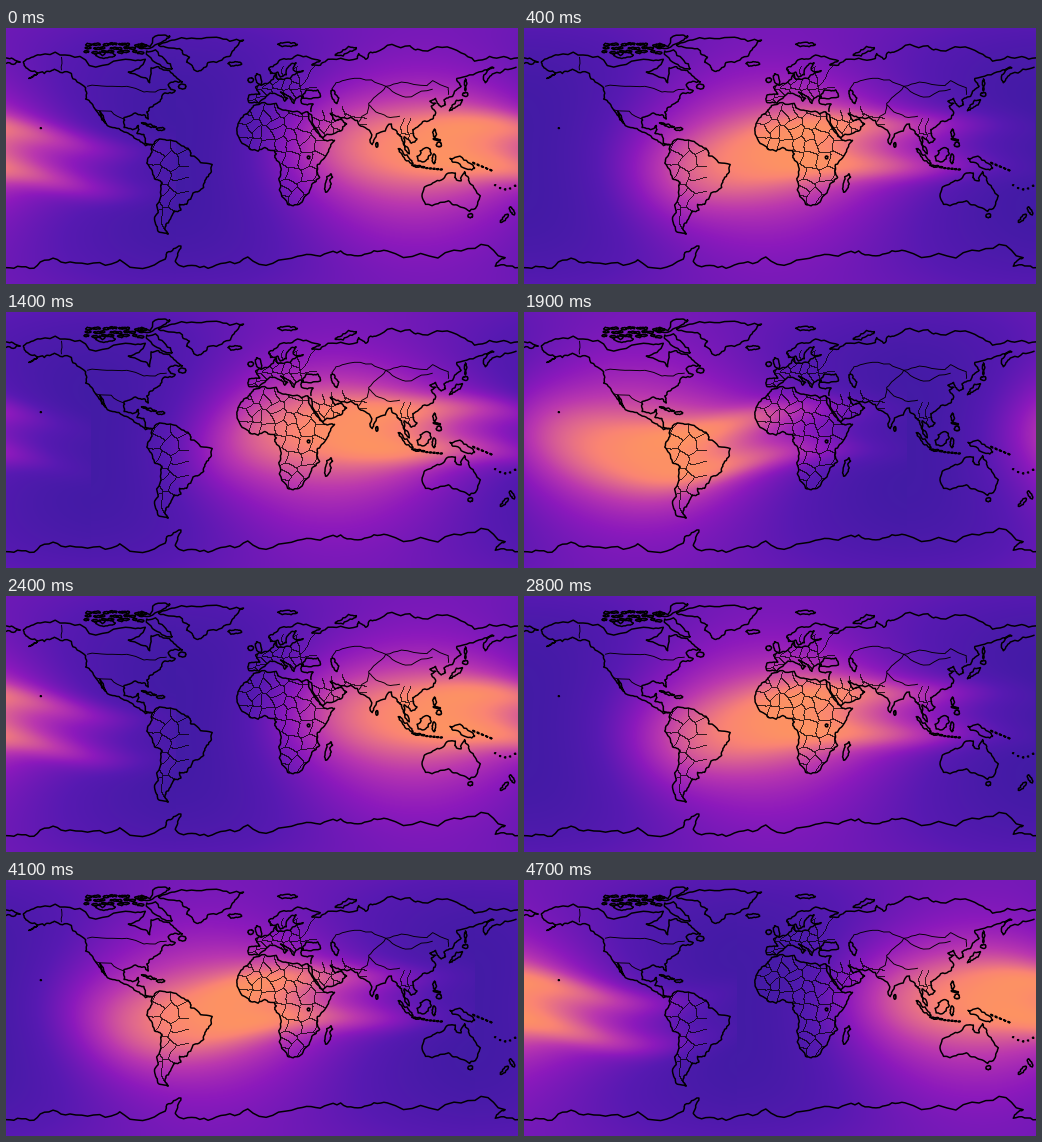
A matplotlib script for the animation above (4800 ms loop, 512x256 px).

```python
import numpy as np
import matplotlib.pyplot as plt
from matplotlib.animation import FuncAnimation
from matplotlib.collections import LineCollection
from matplotlib.colors import LinearSegmentedColormap
from matplotlib.path import Path

W, H, DPI = 512, 256, 100
FRAMES, STEPS_PER_DAY, INTERVAL = 48, 12, 100
rng = np.random.default_rng(4)
x, y = np.meshgrid(np.arange(W) + 0.5, np.arange(H) + 0.5)
coasts, borders = [], []
ink = np.zeros((H, W), bool)


def project(*lonlat):
    p = np.array(lonlat, float).reshape(-1, 2)
    return np.column_stack([(p[:, 0] + 180) * W / 360, (90 - p[:, 1]) * H / 180])


def roughen(p, rounds=3, amount=0.1):
    """Split every segment and push its middle sideways."""
    for _ in range(rounds):
        d = np.diff(p, axis=0)
        side = np.column_stack([-d[:, 1], d[:, 0]])
        mid = p[:-1] + d / 2 + side * rng.normal(0, amount, (len(d), 1))
        out = np.empty((2 * len(p) - 1, 2))
        out[::2], out[1::2] = p, mid
        p = out
    return p


def coast(*lonlat):
    coasts.append(roughen(project(*lonlat)))
    return coasts[-1]


def land(*lonlat):
    return coast(*lonlat, *lonlat[:2])


def island(lon, lat, rx, ry, tilt=0):
    a = np.linspace(0, 2 * np.pi, 9)
    t = np.radians(tilt)
    u, v = rx * np.cos(a), ry * np.sin(a)
    ring = np.column_stack([lon + u * np.cos(t) - v * np.sin(t),
                            lat + u * np.sin(t) + v * np.cos(t)])
    coasts.append(roughen(project(*ring.ravel()), 2, 0.15))


def border(*lonlat):
    borders.append(roughen(project(*lonlat), 2, 0.05))


def countries(outline, west, south, east, north, step):
    """Divide a region into cells around a jittered lattice of centres."""
    gx, gy = np.meshgrid(np.arange(west, east, step), np.arange(south, north, step))
    sites = np.column_stack([gx.ravel(), gy.ravel()]) + rng.uniform(-0.4, 0.4, (gx.size, 2)) * step
    wx, wy = x + 1.2 * np.sin(y / 3), y + 1.2 * np.sin(x / 4)
    cell = np.argmin([(wx - a) ** 2 + (wy - b) ** 2 for a, b in project(*sites.ravel())], axis=0)
    edge = (cell != np.roll(cell, 1, 1)) | (cell != np.roll(cell, 1, 0))
    inside = Path(outline).contains_points(np.column_stack([x.ravel(), y.ravel()]))
    (x0, y1), (x1, y0) = project(west - step, south - step, east + step / 2, north + step / 2)
    box = (x > x0) & (x < x1) & (y > y0) & (y < y1)
    ink[edge & inside.reshape(H, W) & box] = True


# Continents
land(-168, 66, -156, 71, -128, 70, -96, 68, -82, 68, -94, 59, -82, 55, -79, 51.5, -78, 62, -70, 61,
     -65, 60, -56, 52, -66, 50, -65, 48, -61, 46, -66, 44, -70, 43, -76, 36, -81, 31, -80, 26,
     -83, 29, -90, 30, -97, 27, -97, 20, -91, 18.5, -87, 21.5, -88, 16, -83, 15, -82, 9, -77.5, 8,
     -85.5, 10, -94, 16, -105, 20, -114, 31.5, -110, 23, -117, 32.5, -124, 40, -124, 48, -134, 58,
     -146, 61, -153, 58, -164, 54.5, -158, 58.5, -166, 62)
south_america = land(
    -77, 8, -72, 12, -62, 10.5, -51, 4, -50, 0, -35, -6, -39, -15, -41, -22, -48.5, -26, -53, -34,
    -58, -34, -57, -38, -62, -39, -65, -45, -68, -52, -66, -55, -73, -53, -75, -47, -73.5, -37,
    -70.3, -18.5, -76, -14, -81, -5, -77.5, 4)
africa = land(
    32.5, 31, 20, 31.5, 11, 34, 10, 37, -6, 35.5, -10, 30, -17, 21, -17, 14.5, -13, 8.5, -8, 4.5,
    2, 6, 9, 4, 9, -1, 13.5, -9, 12, -17, 18, -34, 26, -34, 33, -26, 35, -20, 40.5, -15, 39, -6,
    46, 2, 51, 11, 44, 11, 37, 20)
europe = coast(
    44, 66, 35, 64, 41, 67, 25, 71, 14, 68, 5, 62, 6, 58, 11, 59, 13, 55.5, 17, 57, 18, 62, 24, 65.5,
    22, 60.5, 29, 60, 24, 58, 20, 54.5, 11, 54, 10, 57.5, 8, 54, 2, 51, -4.5, 48.5, -1.5, 43.5,
    -9, 43, -9, 37.5, -2, 37, 3, 42, 9, 44, 16, 38.5, 18, 40.5, 13, 45, 19.5, 41.5, 22.5, 37,
    24, 40.5, 29, 41.5, 31, 46.5, 39, 46.5, 41, 41.5, 28, 41, 28, 37, 36, 36.5, 34.5, 31)
asia = coast(
    32.5, 30, 35, 28, 43, 13, 55, 17.5, 59.5, 22.5, 56, 26, 51, 25, 48, 30, 57, 27, 67, 25, 72.5, 20,
    77.5, 8, 80.5, 15.5, 91, 22.5, 95, 16, 98.5, 11, 103.5, 1.5, 100, 9, 100, 13.5, 105, 9, 109, 12,
    106, 18.5, 110, 21, 120, 26, 122, 31, 119, 35, 122, 37, 118, 38.5, 122, 40.5, 126, 34.5, 129, 36,
    128, 39.5, 135, 44, 140, 49, 137, 54.5, 155, 59.5, 163, 62, 156, 57, 157, 51.5, 163, 58,
    179, 62.5)
coast(180, 69, 160, 70, 140, 72.5, 113, 74, 104, 77.5, 80, 73, 73, 68, 68, 72, 67, 68.5, 44, 66)
coast(-180, 69, -170, 66, -180, 65)
land(114, -22, 115, -34, 124, -33.5, 131, -31.5, 138, -35, 146, -39, 150, -37, 153.5, -28, 146, -19,
     142.5, -11, 140, -17.5, 135.5, -15, 136, -12, 131, -12, 122, -18)
coast(-180, -78.5, -158, -77, -135, -74.5, -102, -74.5, -100, -73, -68, -72.5, -67, -68, -57, -63.3,
      -61, -74, -58, -77, -35, -78, -10, -71, 25, -70.5, 50, -67, 70, -70, 88, -66.7, 135, -66.2,
      171, -71.5, 164, -77.5, 180, -78.5)
land(-73, 78, -58, 75.5, -51, 69.5, -53, 66, -48, 60.8, -43, 60, -38, 65.7, -23, 70, -19, 76,
     -13, 81.5, -32, 83.5, -60, 82)

# Larger islands and lakes: centre, half axes, tilt
for shape in [(-2.5, 54, 4.2, 1.8, 110), (-8, 53.3, 2, 1.6), (-19, 65, 5, 1.4),
              (18, 78.6, 7, 1.4), (59, 73.5, 8, 1.4, 20), (-79.5, 21.7, 5.5, 0.7, -17),
              (-71.3, 19, 3, 0.9), (-56, 48.8, 2.8, 1.8), (-155.5, 19.6, 0.4, 0.3),
              (46.8, -19, 6.8, 2, 72), (80.8, 7.8, 0.9, 1.7), (101, -0.2, 7.5, 1.4, -46),
              (110, -7.3, 4.7, 0.6, -8), (114, 0.8, 6, 4, 45), (121, -2, 1.2, 3.5),
              (141, -5.2, 9.5, 2.5, -22), (121.3, 16, 1, 3), (124.5, 8, 2, 1.7),
              (136.5, 35.8, 6.2, 1.2, 40), (143, 43.4, 2, 1.5), (143, 50, 0.7, 4.2),
              (146.6, -42, 1.8, 1.5), (175.8, -38.6, 3.3, 1.3, 120), (170.4, -43.8, 4, 1.2, 45),
              (51, 41.8, 5.2, 1.8, 110), (32.8, -1, 1, 1)]:
    island(*shape)
# Arctic archipelago
island(-72, 67.5, 11, 3, -35)
island(-110, 71, 7, 2)
island(-76, 80.5, 12, 2.5, 20)
for lon in np.linspace(-122, -84, 8):
    for lat in (73, 76, 78.2):
        island(lon + rng.uniform(-2, 2), lat + rng.uniform(-0.6, 0.6), rng.uniform(1.5, 3.5), 0.7)
# Island chains of the western Pacific
for t in np.linspace(0, 1, 5):
    island(116 + 10 * t, -8.5 - t, 0.9, 0.3)
    island(149 + 12 * t, -5 - 5 * t, 0.9, 0.3, -30)
    island(164 + 14 * t, -20.5 - 3 * np.sin(3 * t), 0.5, 0.3)
    island(121 + 4 * t, 12 - t, 0.6, 0.5)

border(-123, 49, -109, 49, -95, 49)
border(-95, 49, -83, 45, -75, 45, -67, 47)
border(-141, 69.7, -141, 60.3)
border(-117, 32.5, -106, 31.5, -97, 26)
border(49, 47, 52, 51.5, 61, 54, 77, 53.5, 87, 49, 98, 52, 116, 49.5, 120, 53, 131, 48, 131, 43)
border(68, 24, 74, 30, 75, 37, 80, 42, 87, 49, 97, 42.7, 105, 41.6, 120, 47)
border(75, 36, 80, 31, 88, 27.5, 97, 28)
countries(africa, -14, -30, 46, 36, 9)
countries(south_america, -78, -42, -56, 10, 10)
countries(europe, -6, 38, 36, 60, 6)
countries(asia, 38, 15, 70, 38, 8)
countries(asia, 94, 12, 107, 24, 6)

# Daily bulge of ionised air following the sun along the magnetic equator
a = 2 * np.pi * (x - 130) / W
dip = y - (125.5 + 13 * np.cos(a) + 5 * np.cos(2 * a))
polar = np.abs(y - 128) / 128


def bell(v, width, power=2):
    return np.exp(-np.abs(v / width) ** power)


def skew(u, west, east):
    return bell(u, np.where(u < 0, west, east))


def field(i):
    noon = 426 - W / STEPS_PER_DAY * (i % STEPS_PER_DAY)
    u = (x - noon + W / 2) % W - W / 2
    glow = 0.11 * (1 + np.cos((u - 15) * 2 * np.pi / W)) * (1 - 0.6 * polar ** 2)
    broad = 0.36 * bell(u + 35, 125) * bell(y - 130, 88)
    core = 0.3 * bell(u + 30, 110, 3) * bell(dip, 42)
    tail = 0.26 * skew(u - 60, 100, 145) * bell(dip, 38)
    crests = 0.25 * skew(u - 80, 80, 120) * (bell(dip + 21, 13) + bell(dip - 22, 13))
    v = 0.04 + 0.13 * polar ** 3 + glow + broad + core + tail + crests
    return 1.1 * v / (1 + v ** 4) ** 0.25


stops = [(0, "#3a1ca0"), (0.2, "#5819b2"), (0.4, "#8c19bc"), (0.6, "#b937af"),
         (0.8, "#e1698c"), (0.9, "#fa8473"), (1, "#ff9b5a")]
cmap = LinearSegmentedColormap.from_list("ion", stops)

fig = plt.figure(figsize=(W / DPI, H / DPI), dpi=DPI)
ax = fig.add_axes([0, 0, 1, 1])
ax.axis("off")
view = dict(extent=(0, W, H, 0), interpolation="nearest", aspect="auto")
image = ax.imshow(field(0), cmap=cmap, vmin=0, vmax=1, **view)
ax.imshow(np.dstack([np.zeros((H, W, 3)), 0.75 * ink]), **view)
px = 72 / DPI
for lines, width in ((borders, 0.9), (coasts, 1.5)):
    ax.add_collection(LineCollection(lines, colors="black", linewidths=width * px))
ax.set_xlim(0, W)
ax.set_ylim(H, 0)


def update(i):
    image.set_data(field(i))
    return [image]


anim = FuncAnimation(fig, update, frames=FRAMES, interval=INTERVAL, repeat=True,
                     repeat_delay=0, blit=False)
plt.show()
```
